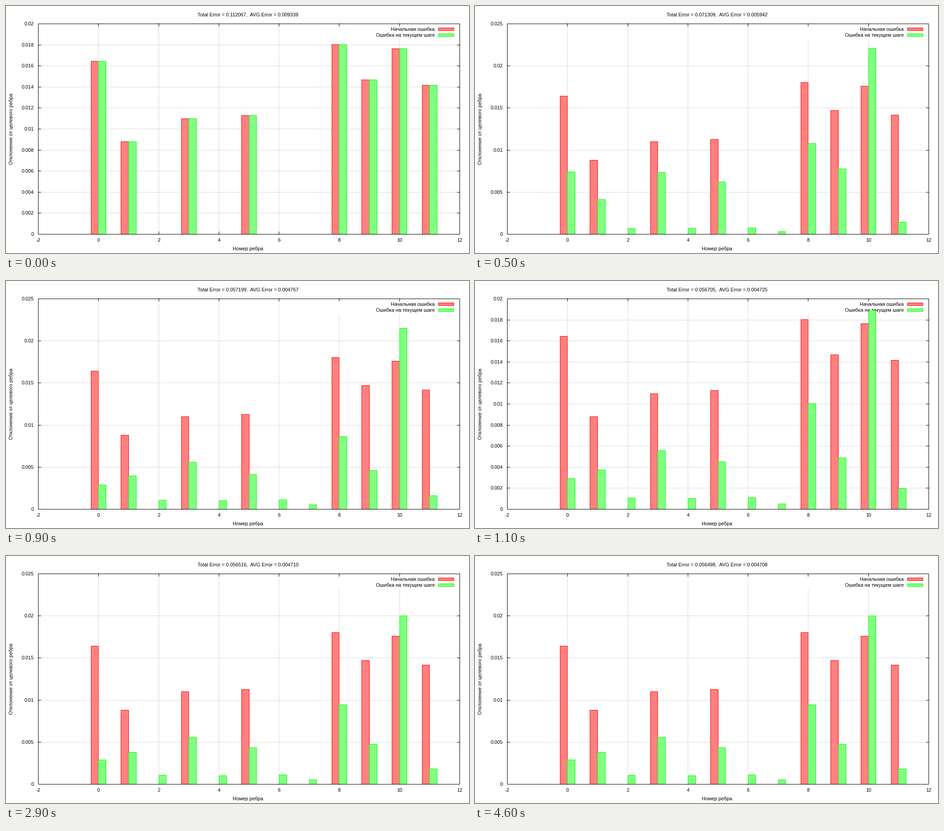
A matplotlib script that plays this animation: 1025x547 px, repeating every 5 s.

```python
import numpy as np
import matplotlib.pyplot as plt
from matplotlib.animation import FuncAnimation
from matplotlib.lines import Line2D
from matplotlib.patches import Rectangle

W, H, DPI = 1025, 547, 64
PX = 72 / DPI
LEFT, RIGHT, TOP, BOTTOM = 71, 1004, 39, 505
TICK = 6
RED, GREEN = ("#ff8080", "#ff0000"), ("#80ff80", "#00ff00")

plt.rcParams.update({
    "font.family": "Liberation Sans",
    "font.size": 10.9 * PX,
    "text.hinting": "force_autohint",
    "text.hinting_factor": 8,
})

# Each edge fades from its start to its settled error (units of 1e-5),
# while one shared swing pushes some edges past their goal and back.
START = np.array([1642, 879, 0, 1099, 0, 1127, 0, 0, 1803, 1468, 1762, 1418])
SETTLED = np.array([292, 383, 108, 556, 101, 433, 112, 51, 943, 478, 2000, 182])
SWING = np.zeros(12)
SWING[[1, 5, 8, 9, 10, 11]] = 40, -60, -220, -40, 420, -60
PACE = np.ones(12)
PACE[[1, 11]] = 5
FADE_END = 7

# Time in 100 ms, total error, swing
KEY_T, KEY_TOTAL, KEY_SWING = zip(
    (0, 0.112067, 0), (3, 0.084925, 0.37), (7, 0.057693, 1),
    (11, 0.056705, -0.27), (27, 0.056530, 0.005), (29, 0.056516, 0.005),
    (42, 0.056499, -0.005), (46, 0.056498, 0.005))

# The picture is held between these times
STEPS = [0, 1, *range(3, 12), 24, 25, 27, 29, 42, 46]

fig = plt.figure(figsize=(W / DPI, H / DPI), dpi=DPI, facecolor="white")
ax = fig.add_axes([0, 0, 1, 1])
ax.set_xlim(0, W)
ax.set_ylim(H, 0)
ax.axis("off")


def x_px(v):
    return round(LEFT + (v + 2) * (RIGHT - LEFT) / 14) + 0.5


def y_px(v, top):
    return max(round(BOTTOM - v / top * (BOTTOM - TOP)), TOP) + 0.5


def line(x0, y0, x1, y1, z=2, color="black", **kw):
    art = Line2D([x0, x1], [y0, y1], lw=PX, color=color, zorder=z,
                 snap=False, **kw)
    return ax.add_line(art)


def grid(x0, y0, x1, y1):
    return line(x0, y0, x1, y1, 1, "#909090", ls=(0, (1, 2)),
                dash_capstyle="butt")


def box(x0, y0, x1, y1, fill, edge, z):
    art = Rectangle((x0, y0), x1 - x0, y1 - y0, fc=fill, ec=edge, lw=PX,
                    zorder=z, joinstyle="miter", snap=False)
    return ax.add_patch(art)


def label(x, y, s, ha="center", rotation=0):
    return ax.text(x, y, s, ha=ha, va="baseline", zorder=3,
                   rotation=rotation, rotation_mode="anchor")


def y_scale(top, step):
    """Grid, ticks and labels of one vertical range."""
    arts = []
    for i in range(round(top / step) + 1):
        y = y_px(i * step, top)
        arts.append(label(62, y + 3.5, f"{i * step:g}", "right"))
        if TOP + 1 < y < BOTTOM:
            arts += [grid(LEFT + 0.5, y, RIGHT + 0.5, y),
                     line(LEFT, y, LEFT + TICK, y),
                     line(RIGHT + 1 - TICK, y, RIGHT + 1, y)]
    return arts


scales = {0.02: y_scale(0.02, 0.002), 0.025: y_scale(0.025, 0.005)}

for v in range(-2, 13, 2):
    x = x_px(v)
    label(x, 522, str(v))
    if -2 < v < 12:
        grid(x, BOTTOM + 0.5, x, 73 if v >= 8 else TOP + 0.5)
        line(x, TOP, x, TOP + TICK)
        line(x, BOTTOM + 1 - TICK, x, BOTTOM + 1)

box(LEFT + 0.5, TOP + 0.5, RIGHT + 0.5, BOTTOM + 0.5, "none", "black", 6)

title = label(536, 23, "")
label(536, 541, "Номер ребра")
label(15, 272, "Отклонение от целевого ребра", rotation=90)
for y, name, colors in [(48.5, "Начальная ошибка", RED),
                        (61.5, "Ошибка на текущем шаге", GREEN)]:
    label(949.5, y + 6.5, name, "right")
    box(957.5, y, 991.5, y + 6, *colors, 3)

first = [box(x_px(i - 0.25), 0, x_px(i), 0, *RED, 4) for i in range(12)]
current = [box(x_px(i), 0, x_px(i + 0.25), 0, *GREEN, 5) for i in range(12)]


def set_bars(bars, values, top):
    for bar, v in zip(bars, values):
        y = y_px(v, top)
        bar.set_y(y)
        bar.set_height(BOTTOM + 0.5 - y)
        bar.set_visible(v > 0)


def errors(t):
    fade = 1 - min(t / FADE_END, 1) ** 1.2
    swing = np.interp(t, KEY_T, KEY_SWING)
    return (SETTLED + (START - SETTLED) * fade ** PACE + SWING * swing) * 1e-5


def update(n):
    t = max(s for s in STEPS if s <= n)
    values = errors(t)
    total = np.interp(t, KEY_T, KEY_TOTAL)
    top = 0.025 if values.max() > 0.02 else 0.02
    for key, arts in scales.items():
        for art in arts:
            art.set_visible(key == top)
    set_bars(first, errors(0), top)
    set_bars(current, values, top)
    title.set_text(f"Total Error = {total:.6f},  AVG Error = {total / 12:.6f}")
    return []


anim = FuncAnimation(fig, update, frames=50, interval=100, repeat=True,
                     repeat_delay=0, blit=False)
plt.show()
```
